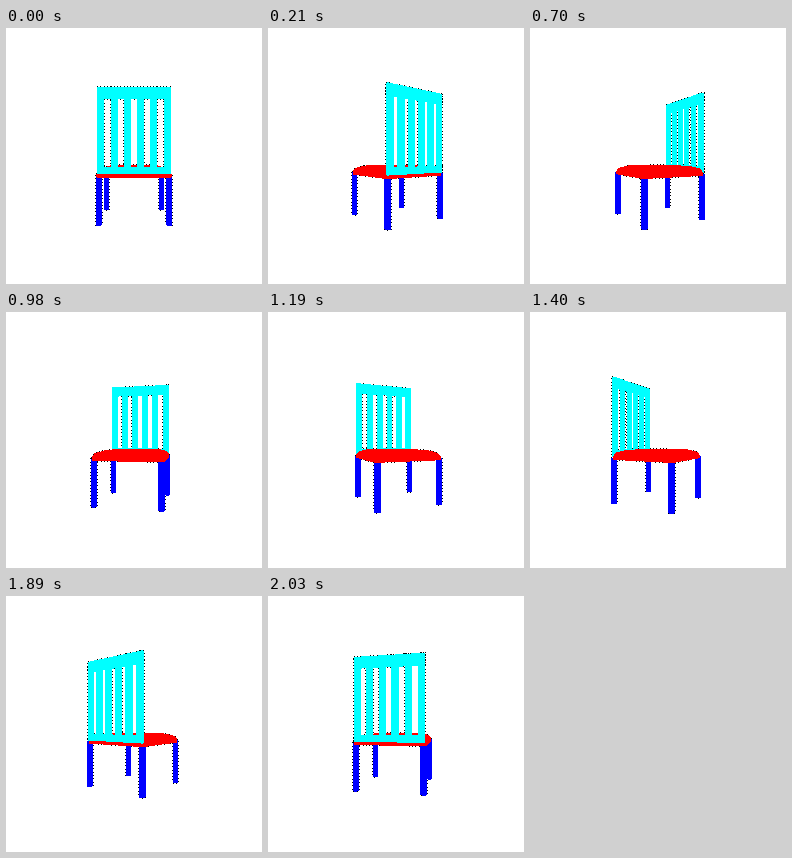
Recreate the animation shown at these times as an HTML page. Size 256 px wide and 256 px high, loop 2.1 s.

```html
<!DOCTYPE html>
<html>
<head>
<meta charset="utf-8">
<style>
html, body { margin: 0; width: 100%; height: 100%; overflow: hidden; background: #fff; }
svg { display: block; }
.rim { stroke: #000; stroke-width: 1; stroke-dasharray: 1 2.3; }
</style>
</head>
<body>
<svg id="stage" width="256" height="256" viewBox="0 0 256 256" shape-rendering="crispEdges"></svg>
<script>
const stage = document.getElementById('stage');
const STEP = 70, STEPS = 30, CAMERA = 245;
const CYAN = '#0ff', RED = '#f00', BLUE = '#00f';

// Points are [x, y, z]: x along the backrest, y down, z towards the backrest.
function box(x0, x1, y0, y1, z0, z1) {
  const points = [];
  for (const x of [x0, x1]) for (const y of [y0, y1]) for (const z of [z0, z1]) points.push([x, y, z]);
  return points;
}

function leg(x, z) {
  const points = [];
  for (let i = 0; i < 16; i++) {
    const a = i * Math.PI / 8;
    for (const y of [17, 60.3]) points.push([x + 2.9 * Math.cos(a), y, z + 2.9 * Math.sin(a)]);
  }
  return points;
}

// Square ring with cut corners
function ring(half, y) {
  const inner = half - 3, points = [];
  for (const s of [-1, 1]) for (const t of [-1, 1])
    points.push([s * half, y, t * inner], [s * inner, y, t * half]);
  return points;
}

const slab = (x0, x1, y0, y1) => box(x0, x1, y0, y1, 30, 32.3);
const legs = [[-30.6, -30.6], [30.6, -30.6], [-30.6, 30.6], [30.6, 30.6]].map(p => leg(...p));
const seat = [[33, 18.8], [33, 16], [31, 12.2], [24, 9.8]].flatMap(p => ring(...p));
const back = [slab(-32, 32, -60.2, -50), slab(-32, 32, 9.5, 16)];
for (let i = 0; i < 6; i++) {
  const x = -32 + i * 11.6;
  back.push(slab(x, x + 6, -60.2, 16));
}

function project([x, y, z], sin, cos) {
  const scale = CAMERA / (CAMERA - z * cos - x * sin);
  return [128 + (z * sin - x * cos) * scale, 128 + y * scale];
}

function hull(points) {
  points.sort((a, b) => a[0] - b[0] || a[1] - b[1]);
  const half = list => {
    const out = [];
    for (const p of list) {
      while (out.length > 1) {
        const [a, b] = out.slice(-2);
        if ((b[0] - a[0]) * (p[1] - a[1]) - (b[1] - a[1]) * (p[0] - a[0]) > 0) break;
        out.pop();
      }
      out.push(p);
    }
    return out.slice(0, -1);
  };
  return [...half(points), ...half(points.slice().reverse())];
}

function draw(step) {
  const angle = step * 2 * Math.PI / STEPS, sin = Math.sin(angle), cos = Math.cos(angle);
  const paint = (parts, color) => parts.map(part => {
    const points = hull(part.map(p => project(p, sin, cos))).join(' ');
    return `<polygon points="${points}" fill="${color}"/>`;
  }).join('');
  const seatShape = paint([seat], RED), backShape = paint(back, CYAN);
  const shapes = paint(legs, BLUE) +
    (cos > -0.15 ? seatShape + backShape : backShape + seatShape);
  // The speckled rim stays visible only outside the filled shapes.
  stage.innerHTML = `<g class="rim">${shapes}</g>${shapes}`;
}

let shown = -1;
function tick() {
  const step = Math.floor(performance.now() / STEP) % STEPS;
  if (step !== shown) draw(shown = step);
  requestAnimationFrame(tick);
}
tick();
</script>
</body>
</html>
```
